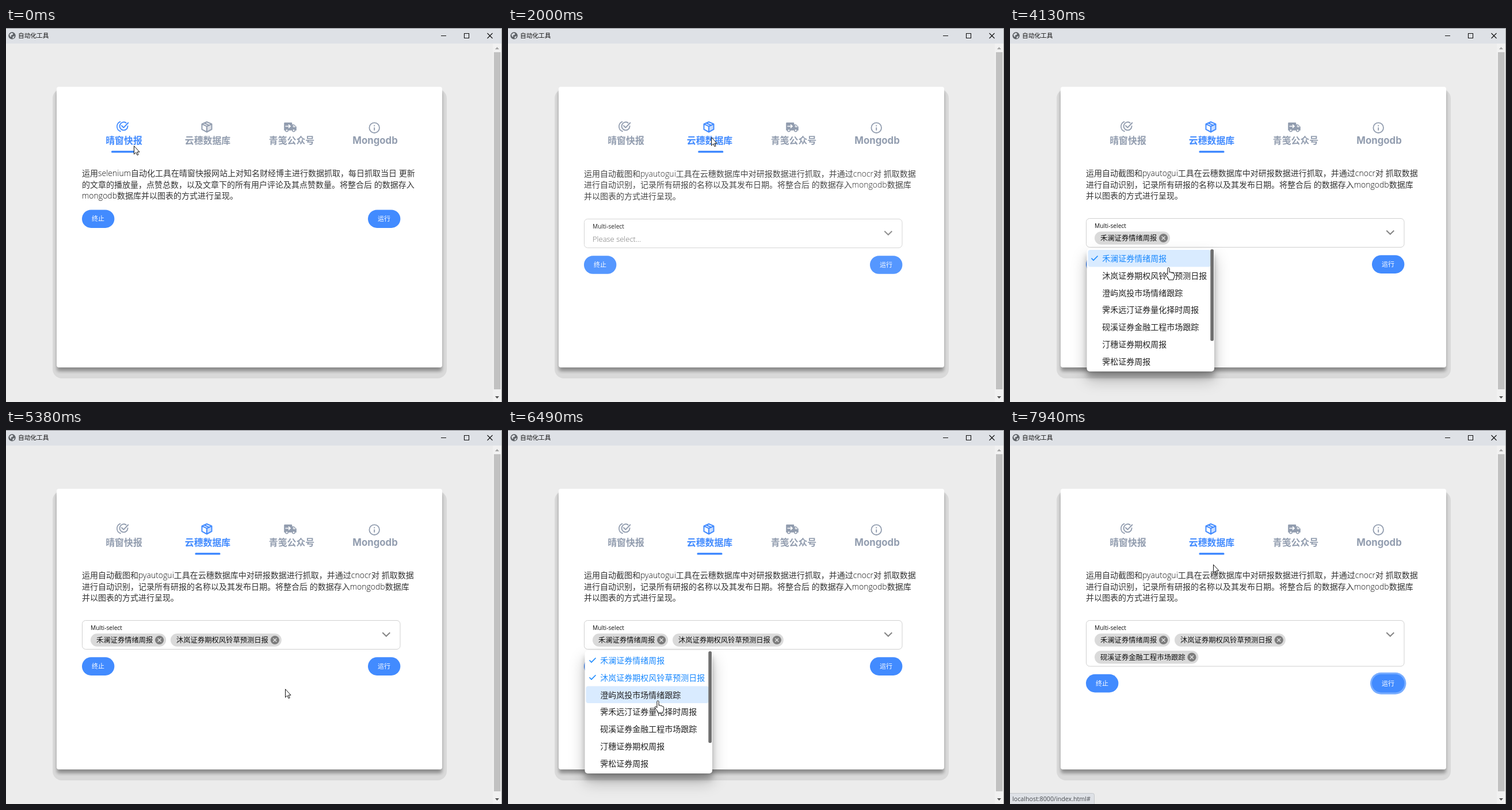
An HTML page for the animation above (8 s loop, 862x649 px).

```html
<!DOCTYPE html>
<html lang="zh-CN">
<head>
<meta charset="utf-8">
<title>自动化工具</title>
<style>
  html, body { margin: 0; width: 100%; height: 100%; overflow: hidden; background: #ececec; }
  svg { display: block; width: 862px; height: 649px; }
  text { font-family: "Open Sans", "Noto Sans CJK SC", "Noto Sans CJK", sans-serif; white-space: pre; }
</style>
</head>
<body>
<svg id="stage" viewBox="0 0 862 649">
  <g id="backdrop"></g>
  <g id="scene"></g>
</svg>
<script>
const LOOP = 8000;
const BLUE = [66, 139, 255], GREY = [146, 157, 175];
const TAB_CLICK = 1760, RUN_HOVER = 7210, RUN_CLICK = 7350;
const PICK_TIMES = [3980, 4990, 6780], PICKED_ROWS = [0, 1, 4];
const MENU_SPANS = [[2960, 5200], [5840, 6950]];
const ROW_H = 29.75;

// The screen is refreshed only at these moments.
const STEPS = [0, 120, 520, 660, 800, 1390,
  1700, 1850, 2000, 2120, 2270, 2390, 2550,
  2820, 2970, 3090, 3240, 3390, 3540, 3690, 3840,
  3980, 4130, 4250, 4400,
  4990, 5120, 5260, 5380, 5500, 5620, 5740, 5860, 5980,
  6130, 6250, 6370, 6490, 6640, 6780, 6920, 7060,
  7210, 7350, 7500, 7650, 7800, 7940];

const POINTER_PATH = [
  [0, 222, 204], [120, 220, 204], [520, 290, 185], [660, 379, 164], [800, 361, 202],
  [1390, 456, 207], [1700, 353, 189], [2120, 353, 189], [2550, 322, 310], [2970, 308, 356],
  [3240, 308, 356], [3690, 272, 400], [3980, 272, 402], [4130, 277, 417], [4400, 270, 440],
  [4990, 272, 436], [5260, 485, 449], [5380, 485, 449], [5740, 345, 366], [5980, 320, 366],
  [6490, 262, 471], [6780, 260, 523], [6920, 540, 490], [7210, 655, 442], [7500, 655, 442],
  [7800, 420, 268], [7940, 353, 233]];

const TABS = [
  { label: '晴窗快报', x: 205, icon: checkIcon },
  { label: '云穗数据库', x: 350.5, icon: boxIcon },
  { label: '青笺公众号', x: 496.5, icon: truckIcon },
  { label: 'Mongodb', x: 641.5, icon: infoIcon }];

const INTRO = [[
  '运用selenium自动化工具在晴窗快报网站上对知名财经博主进行数据抓取，每日抓取当日 更新',
  '的文章的播放量，点赞总数，以及文章下的所有用户评论及其点赞数量。将整合后 的数据存入',
  'mongodb数据库并以图表的方式进行呈现。'
], [
  '运用自动截图和pyautogui工具在云穗数据库中对研报数据进行抓取，并通过cnocr对 抓取数据',
  '进行自动识别，记录所有研报的名称以及其发布日期。将整合后 的数据存入mongodb数据库',
  '并以图表的方式进行呈现。']];

const OPTIONS = ['禾澜证券情绪周报', '沐岚证券期权风铃草预测日报', '澄屿岚投市场情绪跟踪',
  '霁禾远汀证券量化择时周报', '砚溪证券金融工程市场跟踪', '汀穗证券期权周报', '霁松证券周报'];

const ramp = (t, from, span) => Math.max(0, Math.min(1, (t - from) / span));
const easeOut = p => 1 - (1 - p) ** 3;
const easeInOut = p => p * p * (3 - 2 * p);
const backOut = p => 1 + 1.6 * (p - 1) ** 3 + .6 * (p - 1) ** 2;
const mix = (a, b, p) => `rgb(${a.map((v, i) => Math.round(v + (b[i] - v) * p))})`;

const text = (x, y, size, str, attrs = '') =>
  `<text x="${x}" y="${y}" font-size="${size}" ${attrs}>${str}</text>`;
const rect = (x, y, w, h, fill, r = 0, attrs = '') =>
  `<rect x="${x}" y="${y}" width="${w}" height="${h}" rx="${r}" fill="${fill}" ${attrs}/>`;
const line = (d, color, width, attrs = '') =>
  `<path d="${d}" fill="none" stroke="${color}" stroke-width="${width}" ${attrs}/>`;
const shadow = (x, y, w, h, sigma, alpha) =>
  rect(x, y, w, h, '#000', 4, `opacity="${alpha}" style="filter:blur(${sigma}px)"`);
const ROUND = 'stroke-linecap="round" stroke-linejoin="round"';

function checkIcon(c) {
  return line('M198.5 162.6A9 9 0 0 0 199 179.4', c, 1.7, ROUND) +
    line('M208.6 164.6A7 7 0 1 0 211.6 170.3', c, 1.9, ROUND) +
    line('M201 169.5l3.4 3.4 8-8.4', c, 1.9, ROUND);
}
function boxIcon(c) {
  return line('M349 163l8.5 3.7v9.2l-8.5 4.6-8.5-4.6v-9.2zM340.5 166.7l8.5 4 8.5-4M349 170.7v9.6M344.7 165l8.5 3.9', c, 2, ROUND) +
    `<path d="M349 170.7l8.5-4v9.2l-8.5 4.6z" fill="${c}" opacity=".3"/>`;
}
function truckIcon(c) {
  const wheel = x => `<circle cx="${x}" cy="177.6" r="2.2" fill="#fff" stroke="${c}" stroke-width="1.6"/>`;
  return `<path d="M484.5 164h11.5q1.3 0 1.3 1.4v1.8h3.3l4.2 4.3v6.3H483.2V165.4q0-1.4 1.3-1.4z" fill="${c}"/>` +
    line('M485.5 170.5h8M491 167.6l3 2.9-3 2.9', '#fff', 1.6) +
    line('M499.3 169h1l2.4 2.6h-3.4z', '#fff', 1) + wheel(488) + wheel(500);
}
function infoIcon(c) {
  return `<circle cx="640.2" cy="173.2" r="8.8" fill="none" stroke="${c}" stroke-width="1.8"/>` +
    line('M640.2 172.4v5.4M640.2 168.4v2', c, 1.9);
}

function drawBackdrop() {
  return rect(0, 0, 862, 649, '#ececec') +
    rect(0, 0, 862, 27, '#dee1e6') + rect(0, 0, 862, 1, '#8a8c90') +
    '<circle cx="10.5" cy="13.3" r="6.2" fill="#5f6368"/>' +
    '<path d="M6 11.5l3.5-3 3 1-1 2.5-3 .5 1 2-2 1zM11.5 15l3.5-1-1.5 3.5-2 .8z" fill="#dee1e6"/>' +
    text(21, 17.3, 10.7, '自动化工具', 'fill="#111"') +
    line('M756 13.5h9M796.5 9.5h8v8h-8zM836.5 9l9 9M845.5 9l-9 9', '#111', 1.1) +
    rect(846, 27, 16, 622, '#f1f1f1') + rect(848, 42, 11.5, 585, '#c1c1c1') +
    '<path d="M850 37l3.5-4 3.5 4z" fill="#a3a3a3"/><path d="M850 639l3.5 4 3.5-4z" fill="#505050"/>' +
    rect(861, 0, 1, 649, '#a0a0a0') +
    rect(81, 106, 685, 502, '#d9d9d9', 16) +
    shadow(88, 110, 670, 486, 2.5, .2) + shadow(90, 110, 666, 484, 3.5, .2) +
    rect(88, 102, 670, 487, '#fff', 4);
}

function drawTabs(t) {
  const p = ramp(t, TAB_CLICK, 180);
  const colors = [mix(BLUE, GREY, p), mix(GREY, BLUE, p), mix(GREY, GREY, 0), mix(GREY, GREY, 0)];
  const slide = 183 + 145.5 * backOut(ramp(t, TAB_CLICK, 330));
  return TABS.map(({ label, x, icon }, i) => {
    const latin = label === 'Mongodb';
    const face = latin ? 'style="font-family:Inter,sans-serif"' : '';
    return icon(colors[i]) + text(x, 200.8, latin ? 16.8 : 15.9, label,
      `text-anchor="middle" font-weight="700" fill="${colors[i]}" ${face}`);
  }).join('') + rect(slide, 213, 44, 3.6, mix(BLUE, BLUE, 0), 1.5);
}

const drawIntro = lines => lines.map((str, i) => text(132, 257.2 + i * 19.3, 14,
  str.replace(/[a-z]+/g, '<tspan font-weight="300" fill="#111">$&</tspan>'), 'fill="#333"')).join('');

function drawButtons(y, focused) {
  const button = (x, label) => rect(x, y, 56.4, 31.6, mix(BLUE, BLUE, 0), 15.8) +
    text(x + 28, y + 19.8, 11, label, 'fill="#fff" text-anchor="middle"');
  return button(132, '终止') + (focused ? rect(626, y - 3, 62.5, 38, '#78adff', 19) : '') + button(629, '运行');
}

function drawChip(x, y, label) {
  const w = label.length * 12.33 + 32.5, cx = x + w - 11.5;
  return rect(x, y, w, 22.5, '#dadada', 11.2) + text(x + 10, y + 15.7, 12.3, label, 'fill="#111"') +
    `<circle cx="${cx}" cy="${y + 11.2}" r="7.6" fill="#7d7d7d"/>` +
    line(`M${cx - 3} ${y + 8.2}l6 6m0-6l-6 6`, '#e4e4e4', 1.4);
}

function drawSelect(picks) {
  const h = picks > 2 ? 79.5 : 50;
  const spots = [[147, 353.3], [286, 353.3], [147, 383]];
  const body = picks
    ? spots.slice(0, picks).map(([x, y], i) => drawChip(x, y, OPTIONS[PICKED_ROWS[i]])).join('')
    : text(147, 370, 13, 'Please select...', 'font-weight="300" fill="#666"');
  return rect(132.5, 330.5, 552.5, h, '#fff', 6, 'stroke="#d0d0d0"') +
    text(147, 346.6, 10.2, 'Multi-select', 'fill="#111"') + body +
    line('M654.3 351.5l6.5 6.3 6.5-6.3', '#858585', 2);
}

function menuProgress(t) {
  return Math.max(...MENU_SPANS.map(([open, close]) =>
    easeOut(ramp(t, open, 300)) * (1 - ramp(t, close, 150))));
}

const overMenu = ([x, y], top) => x > 134 && x < 350 && y > top + 6 && y < top + 212;

function drawMenu(progress, picks, top, pointer) {
  if (!progress) return '';
  const hovered = overMenu(pointer, top) ? Math.floor((pointer[1] - 6 - top) / ROW_H) : -1;
  const rows = OPTIONS.map((label, i) => {
    const y = top + 2 + i * ROW_H, on = PICKED_ROWS.slice(0, picks).includes(i);
    return (i === hovered ? rect(135.5, y, 213.5, 29.5, '#d9ebff', 4) : '') +
      (on ? line(`M141.5 ${y + 14.5}l3.5 3.5 7.5-7.5`, '#1989ff', 1.6) : '') +
      text(160.3, y + 20.2, 14, label, `fill="${on ? '#1989ff' : '#222'}"`);
  }).join('');
  const bar = progress === 1 ? rect(348.3, top + 1, 5.7, 159, '#6f6f6f', 2.5) : '';
  const scale = .9 + .1 * progress, cy = top + 106;
  return `<g opacity="${progress}" transform="translate(244 ${cy}) scale(${scale}) translate(-244 ${-cy})">` +
    shadow(133.5, top + 14, 221.5, 213, 14, .26) + shadow(133.5, top + 10, 221.5, 213, 5, .22) +
    rect(133.5, top, 221.5, 213, '#fff', 5) + rows + bar + '</g>';
}

function pointerAt(t) {
  const i = POINTER_PATH.findLastIndex(k => k[0] <= t);
  const [t0, x0, y0] = POINTER_PATH[i], [t1, x1, y1] = POINTER_PATH[i + 1] || [LOOP, x0, y0];
  const p = (t - t0) / (t1 - t0);
  return [x0 + (x1 - x0) * p, y0 + (y1 - y0) * p].map(Math.round);
}

function drawPointer([x, y], hand) {
  const d = hand
    ? 'M-3.1 11V.5a1.6 1.6 0 0 1 3.2 0V7q2.8-1.5 3.2.8q2.6-1 3 1q2.4-.6 2.4 1.6V14q0 2-1.5 4v2H-1.5v-2l-5-7q-.8-2 1-2.2q1.2 0 2.4 2.2z'
    : 'M.5.7V15l3.3-3.1 2.3 4.8 2-.9-2.2-4.7h4.2z';
  return `<path transform="translate(${x} ${y})" d="${d}" fill="#fff" stroke="#111" stroke-width="1"/>`;
}

function drawScene(t) {
  const pointer = pointerAt(t);
  const picks = PICK_TIMES.filter(at => t >= at).length;
  const grown = picks > 2 ? 29.5 : 0;
  const menuTop = 383 + grown, menu = menuProgress(t);
  const onRun = t >= RUN_HOVER && pointer[0] > 629 && pointer[1] > 424;
  let content = drawIntro(INTRO[0]) + drawButtons(315.4, false);
  if (t >= TAB_CLICK) {
    const p = easeInOut(ramp(t, TAB_CLICK, 300));
    content = `<g opacity="${p}" transform="translate(0 ${9 * (1 - p)})">` + drawIntro(INTRO[1]) +
      drawSelect(picks) + drawButtons(394.3 + grown, t >= RUN_CLICK) + '</g>';
  }
  const status = t < RUN_HOVER ? '' : rect(-4, 630.5, 150.5, 22, '#dee1e6', 3, 'stroke="#c4c7cb"') +
    text(4, 643.6, 10.7, 'localhost:8000/index.html#', 'fill="#4a4d51"');
  return drawTabs(t) + content + drawMenu(menu, picks, menuTop, pointer) + status +
    drawPointer(pointer, onRun || (menu > 0 && overMenu(pointer, menuTop)));
}

const scene = document.getElementById('scene');
document.getElementById('backdrop').innerHTML = drawBackdrop();
const start = performance.now();
let shown = -1;

function tick() {
  const now = (performance.now() - start) % LOOP;
  const step = STEPS.findLast(at => at <= now);
  if (step !== shown) {
    shown = step;
    scene.innerHTML = drawScene(step);
  }
  requestAnimationFrame(tick);
}
tick();
</script>
</body>
</html>
```
